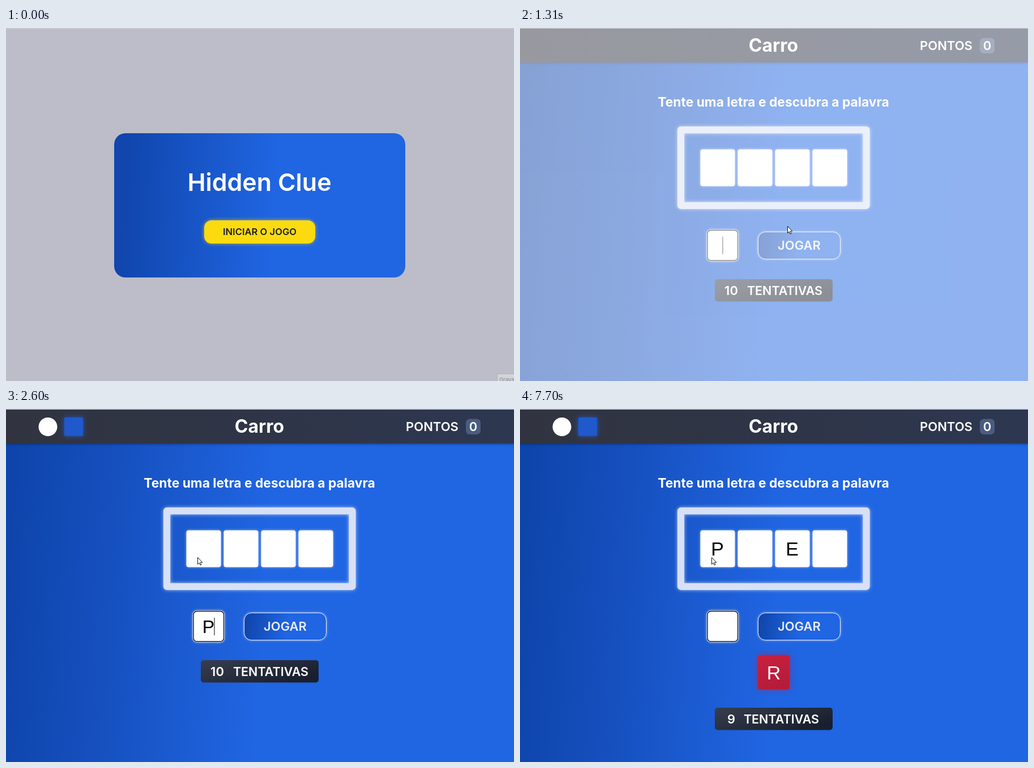
Recreate the animation shown at these times as an HTML page. Size 897x624 px, loop 8 s.

```html
<!DOCTYPE html>
<html lang="pt">
<head>
<meta charset="utf-8">
<style>
html, body { margin: 0; height: 100%; overflow: hidden; background: #fff }
svg { display: block; width: 100vw; height: 100vh }
text { font-family: Inter, Roboto, sans-serif; font-weight: 700; font-size: 22px; fill: #fff; text-anchor: middle }
.letter { font: 34px "Liberation Sans", Arial, sans-serif; fill: #000 }
.glow { filter: drop-shadow(0 0 3px #ffffffa0) }
.soft { filter: drop-shadow(0 0 2px #ffffff90) }
#start { filter: drop-shadow(0 0 3px #fbdb10b0) }
#start.hover { filter: drop-shadow(0 0 5px #fbdb10) }
#wrong { filter: drop-shadow(0 0 6px #b01e4ab0) }
</style>
</head>
<body>
<svg viewBox="0 0 897 624">
  <defs>
    <linearGradient id="page" gradientUnits="userSpaceOnUse" x1="20" y1="0" x2="478" y2="33">
      <stop stop-color="#0e45ab"/><stop offset=".4" stop-color="#1650bf"/><stop offset="1" stop-color="#2065e2"/>
    </linearGradient>
    <linearGradient id="card" gradientUnits="userSpaceOnUse" x1="215" y1="186" x2="480" y2="202">
      <stop stop-color="#1046ad"/><stop offset="1" stop-color="#2065e2"/>
    </linearGradient>
    <linearGradient id="play" x2=".55" y2=".03">
      <stop offset=".1" stop-color="#1047ae"/><stop offset="1" stop-color="#2065e2"/>
    </linearGradient>
    <linearGradient id="head"><stop stop-color="#313440"/><stop offset=".5" stop-color="#2f3547"/><stop offset="1" stop-color="#2d3751"/></linearGradient>
    <linearGradient id="dark" y2=".6"><stop stop-color="#373e4e"/><stop offset="1" stop-color="#191f2e"/></linearGradient>
    <linearGradient id="red" x2=".3" y2="1"><stop stop-color="#c9203f"/><stop offset="1" stop-color="#b51c3b"/></linearGradient>
  </defs>

  <g id="intro">
    <rect width="897" height="624" fill="#bdbdc9"/>
    <rect x="191" y="186" width="514" height="255" rx="20" fill="url(#card)"/>
    <text x="447.5" y="288" style="font-size:43px;font-weight:600">Hidden Clue</text>
    <rect id="start" x="350" y="340" width="196" height="41" rx="13" fill="#fbdb10"/>
    <text x="448" y="366" style="font-size:16.6px;font-weight:600;fill:#1d1f20">INICIAR O JOGO</text>
    <g id="tip">
      <rect x="867.5" y="611.5" width="40" height="20" fill="#d3d3da" stroke="#b4b4be"/>
      <text x="871" y="625" style="font-size:9.5px;font-weight:400;fill:#85858e;text-anchor:start">Gravar</text>
    </g>
  </g>

  <g id="game">
    <rect width="897" height="624" fill="url(#page)"/>
    <rect width="897" height="61" fill="url(#head)" style="filter:drop-shadow(0 1px 2px #0006)"/>
    <g id="links">
      <circle cx="74" cy="31.5" r="16.5" fill="#fff"/>
      <rect x="103" y="15" width="33" height="32.5" rx="1" fill="#2059cb" style="filter:drop-shadow(0 0 4px #2059cb)"/>
    </g>
    <text x="447.5" y="42" style="font-size:32px">Carro</text>
    <text x="752.5" y="39" style="font-weight:600">PONTOS</text>
    <rect x="812" y="17.5" width="26" height="27.5" rx="7" fill="#4a5d80"/>
    <text x="825" y="39" style="font-weight:600">0</text>
    <text x="447.5" y="139" style="font-size:22.8px">Tente uma letra e descubra a palavra</text>
    <rect class="glow" x="284" y="180.2" width="327.5" height="133.6" fill="none" stroke="#d7e0f6" stroke-width="12.2" stroke-linejoin="round"/>
    <g id="cells"></g>
    <rect class="soft" x="329.5" y="356" width="56.5" height="56.5" rx="8" fill="#fff"/>
    <rect x="331" y="357.5" width="53.5" height="53.5" rx="6" fill="#fff" stroke="#101010" stroke-width="1.4"/>
    <text id="typed" class="letter" x="357.5" y="396" style="font-size:32px"></text>
    <rect id="caret" y="369" width="1" height="31"/>
    <rect class="soft" x="420.5" y="360.5" width="145" height="48" rx="13" fill="url(#play)" stroke="#e8eefc"/>
    <text x="493" y="392" style="font-weight:600;fill:#ebecf8">JOGAR</text>
    <g id="wrong">
      <rect x="420" y="435" width="56" height="60.5" rx="3.5" fill="url(#red)"/>
      <text class="letter" x="448" y="477.5" style="fill:#fff">R</text>
    </g>
    <g id="tries">
      <rect x="344" y="444" width="208" height="39.5" rx="5" fill="url(#dark)"/>
      <text id="count" y="471.5" style="font-weight:600">10</text>
      <text id="label" y="471.5" style="font-size:21.5px;font-weight:600">TENTATIVAS</text>
    </g>
  </g>
  <rect width="897" height="1" fill="#cfcfd8"/>
  <g id="cursor" fill="#fff" stroke="#111" stroke-linejoin="round">
    <path id="arrow" d="M.5 .5V12.5L3.2 10L5 14L7 13.1L5.2 9.2H8.8Z"/>
    <path id="hand" d="M2 1Q3.5-.5 4.5 1V6L10.5 7.5Q12 8 11.5 10L10 16H4L-1 10Q-1 8 2 10Z"/>
  </g>
</svg>
<script>
const LOOP = 8000;
const $ = id => document.getElementById(id);
const clamp = v => Math.max(0, Math.min(1, v));
const smooth = v => (v = clamp(v)) * v * (3 - 2 * v);
const show = (id, on) => $(id).style.display = on ? '' : 'none';

const letters = [0, 1, 2, 3].map(i => {
  const x = 318.5 + 66 * i;
  $('cells').insertAdjacentHTML('beforeend',
    `<rect class="soft" x="${x}" y="214.5" width="61" height="65" rx="4" fill="#fff"/>
     <text class="letter" x="${x + 30}" y="259"></text>`);
  return $('cells').lastElementChild;
});

// time, x, y
const path = [[0, 905, 632], [430, 492, 325], [600, 474, 349], [700, 472, 350],
  [1330, 472, 350], [1590, 331, 274], [1800, 338, 262]];
// the field holds a letter from one time to the other
const typing = [['P', 2600, 3000], ['R', 4560, 4890], ['E', 6180, 6640]];
const caretFlips = [890, 1540, 2070, 3150, 3680, 4160, 4560, 5090, 5620, 6150, 6180, 6710, 7170, 7700];

function cursorAt(t) {
  const i = path.findIndex(p => p[0] > t);
  if (i < 0) return path.at(-1).slice(1);
  const [a, b] = [path[i - 1], path[i]];
  const k = smooth((t - a[0]) / (b[0] - a[0]));
  return [1, 2].map(j => a[j] + (b[j] - a[j]) * k);
}

function draw(t) {
  const playing = t >= 890;
  show('intro', !playing);
  show('game', playing);
  show('tip', t < 70);
  $('game').style.opacity = smooth((t - 833) / 960);
  $('links').style.opacity = clamp((t - 1660) / 210);

  const [x, y] = cursorAt(t);
  const hover = !playing && y > 340 && y < 381 && x < 546;
  $('cursor').setAttribute('transform', `translate(${x} ${y})`);
  show('arrow', !hover);
  show('hand', hover);
  $('start').classList.toggle('hover', hover);

  const key = typing.find(([, from, to]) => t >= from && t < to);
  $('typed').textContent = key ? key[0] : '';
  show('caret', caretFlips.filter(f => f <= t).length % 2);
  $('caret').setAttribute('x', key ? 367.5 : 357.5);
  letters[0].textContent = t >= 3000 ? 'P' : '';
  letters[2].textContent = t >= 6640 ? 'E' : '';

  const since = (t - 4890) / 1000, missed = since >= 0;
  const left = Math.exp(-5.28 * since);
  show('wrong', missed);
  $('wrong').setAttribute('transform', `translate(${133 * left} 0)`);
  $('wrong').style.opacity = clamp(1.05 - left);
  $('tries').setAttribute('transform', `translate(0 ${missed ? 84 : 0})`);
  $('count').textContent = missed ? 9 : 10;
  $('count').setAttribute('x', 373);
  $('label').setAttribute('x', missed ? 461.5 : 467.5);
}

function tick() {
  draw(performance.now() % LOOP);
  requestAnimationFrame(tick);
}
tick();
</script>
</body>
</html>
```
